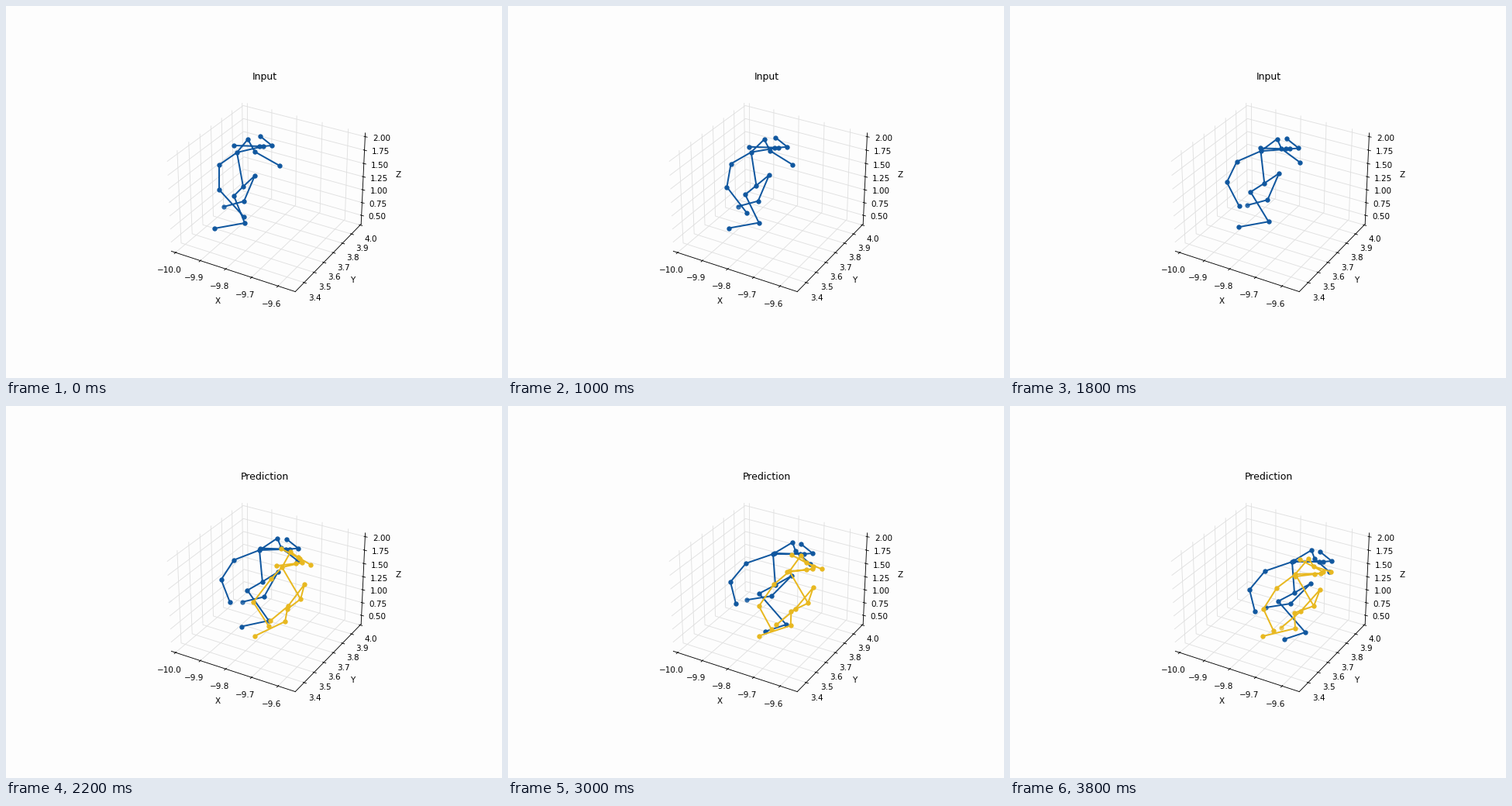
These frames come from a looping animation (640x480 px, 4 s). A matplotlib script:

```python
import matplotlib.pyplot as plt
import numpy as np
from matplotlib.animation import FuncAnimation
from matplotlib.lines import Line2D

W, H, DPI = 640, 480, 80
STEP, FRAMES, SWITCH = 200, 20, 2000
PAPER, BLUE, GOLD = "#fdfdfd", "#10579f", "#e8b820"

CHAINS = [
    ("neck", "nose", "r_eye", "r_ear"),
    ("nose", "l_eye", "l_ear"),
    ("neck", "r_shoulder", "r_elbow", "r_wrist"),
    ("neck", "l_shoulder", "l_elbow", "l_wrist"),
    ("neck", "pelvis", "r_hip", "r_knee", "r_ankle"),
    ("pelvis", "l_hip", "l_knee", "l_ankle"),
]
HEAD = ("nose", "r_eye", "r_ear", "l_eye", "l_ear")

# Start poses, as offsets from the neck in stage pixels.
TRUE_START = {
    "nose": (34, -8), "r_eye": (29, -8), "r_ear": (-4, -9),
    "l_eye": (45, -9), "l_ear": (30, -21),
    "r_shoulder": (-23, 16), "r_elbow": (-23, 48), "r_wrist": (9, 83),
    "l_shoulder": (14, -17), "l_elbow": (23, -1), "l_wrist": (55, 17),
    "pelvis": (8, 44), "r_hip": (-4, 56), "r_knee": (10, 91), "r_ankle": (-29, 98),
    "l_hip": (23, 30), "l_knee": (9, 63), "l_ankle": (-17, 70),
}
PRED_START = {
    "nose": (26, -6), "r_eye": (18, -5), "r_ear": (-7, -2),
    "l_eye": (23, -11), "l_ear": (-1, -24),
    "r_shoulder": (-14, 15), "r_elbow": (-37, 45), "r_wrist": (-17, 76),
    "l_shoulder": (11, -20), "l_elbow": (17, -12), "l_wrist": (29, -3),
    "pelvis": (24, 41), "r_hip": (7, 54), "r_knee": (4, 70), "r_ankle": (-35, 86),
    "l_hip": (29, 22), "l_knee": (8, 50), "l_ankle": (-15, 69),
}

# How far each joint swings away from its start offset.
TRUE_BODY = {
    **dict.fromkeys(HEAD, (6, 8)),
    "r_shoulder": (-12, -4), "r_elbow": (-32, -12), "r_wrist": (-57, -19),
    "l_shoulder": (11, 2), "l_elbow": (6, -3), "l_wrist": (-7, -4),
    "pelvis": (-5, -4), "r_hip": (-14, -5), "l_hip": (1, -2),
}
TRUE_STEP = {
    "r_knee": (7, 0), "r_ankle": (19, 2), "l_knee": (-11, -9), "l_ankle": (-17, -11),
}
PRED_BODY = {
    **dict.fromkeys(HEAD, (7, 5)), "l_eye": (13, 8),
    "r_shoulder": (-10, 3), "r_elbow": (-4, 0), "r_wrist": (-11, -3),
    "l_shoulder": (6, 0), "l_elbow": (11, 1), "l_wrist": (26, 0),
    "r_hip": (-8, -4), "r_knee": (-4, 0), "r_ankle": (-7, -3),
    "l_hip": (3, -2), "l_knee": (-1, -2), "l_ankle": (-3, 0),
}
PRED_WOBBLE = {"l_elbow": (4, -1), "l_wrist": (9, 0), "r_ankle": (0, 3)}


def ramp(t, start, end):
    s = np.clip((t - start) / (end - start), 0, 1)
    return s * s * (3 - 2 * s)


def swing(pose, moves, amount):
    for name, move in moves.items():
        pose[name] = pose[name] + amount * np.array(move)


def on_stage(offsets, neck):
    neck = np.array(neck)
    return {"neck": neck, **{name: neck + o for name, o in offsets.items()}}


def true_pose(t):
    keys = (0, 1400, 2200, 3000, 3800)
    neck = (np.interp(t, keys, (298, 320, 327, 342, 364)),
            np.interp(t, keys, (189, 188.5, 186, 191, 201)))
    pose = on_stage(TRUE_START, neck)
    swing(pose, TRUE_BODY, ramp(t, 0, 3000))
    swing(pose, TRUE_STEP, ramp(t, 1700, 3100))
    return pose


def pred_pose(t):
    drift = ramp(t, 2100, 3700)
    pose = on_stage(PRED_START, (356 + 12 * drift, 208 + 9 * drift))
    swing(pose, PRED_BODY, drift)
    swing(pose, PRED_WOBBLE, np.sin(2 * np.pi * (t - 2640) / 650))
    return pose


class Skeleton:
    def __init__(self, pose_at, color, z):
        self.pose_at = pose_at
        dot = dict(ls="", marker="o", ms=4.7, mew=1)
        self.bones = self.add(color=color, lw=1.8, zorder=z)
        self.dots = self.add(color=color, zorder=z + 0.2, **dot)
        self.far = self.add(color=color, zorder=z + 0.1, **dot)

    def add(self, **style):
        return fig.add_artist(Line2D([], [], transform=fig.transFigure, **style))

    def show(self, t, visible=True, far_alpha=1.0):
        for part in (self.bones, self.dots, self.far):
            part.set_visible(visible)
        pose = {name: (x / W, 1 - y / H) for name, (x, y) in self.pose_at(t).items()}
        gap = (np.nan, np.nan)
        path = [p for chain in CHAINS for p in [*(pose[j] for j in chain), gap]]
        self.bones.set_data(*zip(*path))
        self.dots.set_data(*zip(*(p for j, p in pose.items() if j != "l_ankle")))
        self.far.set_data(*([v] for v in pose["l_ankle"]))
        self.far.set_alpha(far_alpha)


plt.rcParams.update({
    "font.family": "DejaVu Sans",
    "font.size": 9.4,
    "figure.facecolor": PAPER,
    "axes.facecolor": PAPER,
    "grid.color": "#e0e0e0",
    "grid.linewidth": 0.8,
})

fig = plt.figure(figsize=(W / DPI, H / DPI), dpi=DPI)
ax = fig.add_axes([0.2219, 0.1947, 0.6006, 0.5929], projection="3d")
ax.set(xlim=(-10.017, -9.536), ylim=(3.313, 4.0105), zlim=(0.326, 2.066),
       xlabel="X", ylabel="Y", zlabel="Z")
ax.set_xticks(np.linspace(-10, -9.6, 5))
ax.set_yticks(np.linspace(3.4, 4.0, 7))
ax.set_zticks(np.linspace(0.5, 2.0, 7))
for axis in (ax.xaxis, ax.yaxis, ax.zaxis):
    axis.set_pane_color(PAPER)
title = ax.set_title("Input")

truth = Skeleton(true_pose, BLUE, 3)
guess = Skeleton(pred_pose, GOLD, 4)


def update(i):
    t = i * STEP
    predicting = t >= SWITCH
    title.set_text("Prediction" if predicting else "Input")
    truth.show(t, far_alpha=0.78)
    guess.show(t, predicting, far_alpha=1 - 0.35 * ramp(t, 3400, 3800))
    return []


anim = FuncAnimation(fig, update, frames=FRAMES, interval=STEP, repeat=True,
                     repeat_delay=0, blit=False)
plt.show()
```
